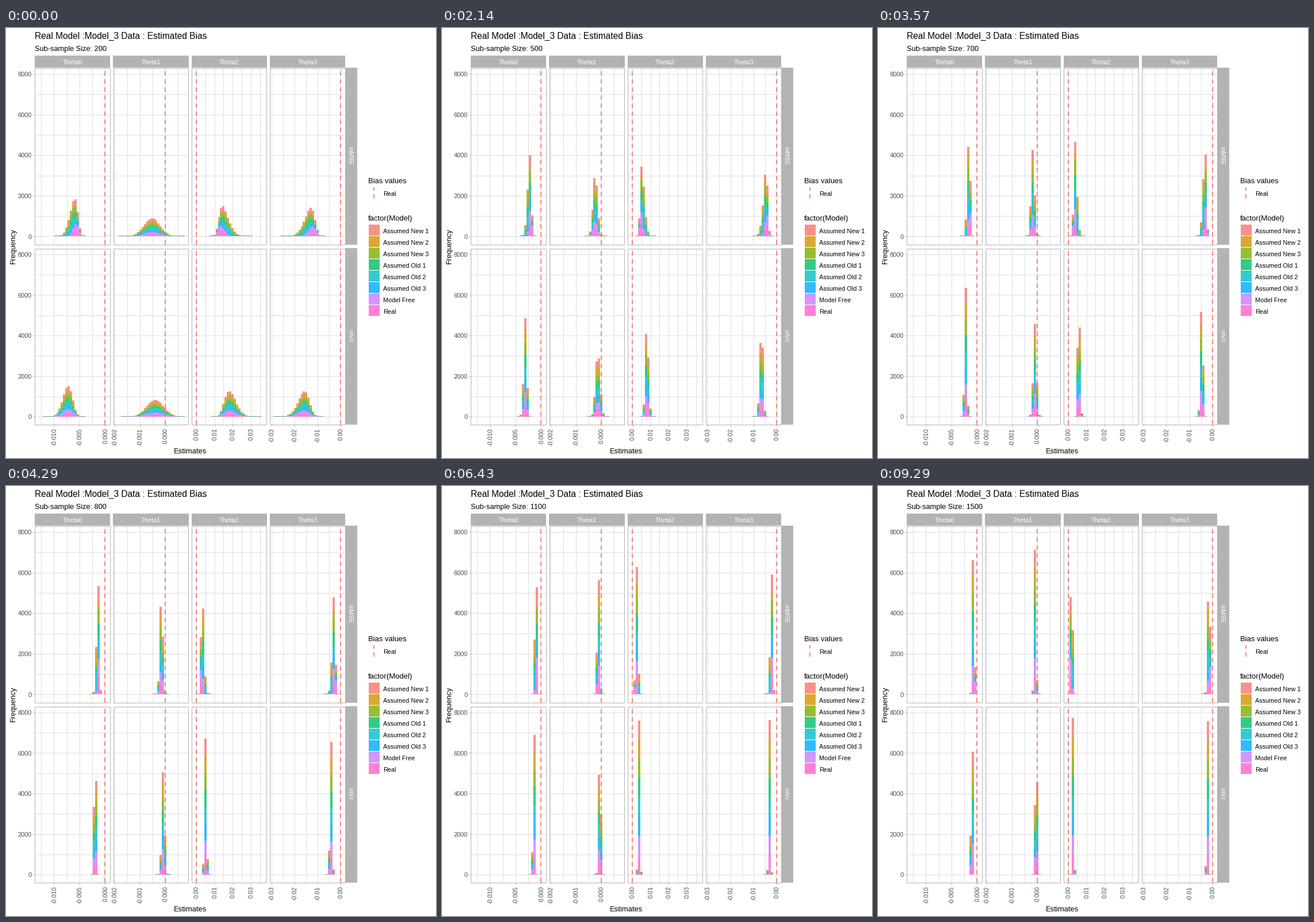
Recreate the animation shown at these times as a matplotlib script. Size 748x748 px, loop 10000 ms.

```python
import math

import numpy as np
import matplotlib.pyplot as plt
from matplotlib.animation import FuncAnimation
from matplotlib.collections import LineCollection, PolyCollection
from matplotlib.colors import to_rgba
from matplotlib.patches import Rectangle

SIZE, DPI = 748, 100
LOOP, TICKS, STEPS = 10000, 100, 14
plt.rcParams["font.family"] = "Liberation Sans"

GREY, GRID, RED, TICK = "#b3b3b3", "#dedede", "#f8766d", "#4d4d4d"
MODELS = [f"Assumed {age} {i}" for age in ("New", "Old") for i in (1, 2, 3)]
MODELS += ["Model Free", "Real"]
FILLS = ["#f8766d", "#cd9600", "#7cae00", "#00be67",
         "#00bfc4", "#00a9ff", "#c77cff", "#ff61cc"]
ALPHA = 0.8
THIN = to_rgba("#86a98a")       # bars with almost no count

LEFT, PITCH, WIDTH = 50.5, 136.3, 130.4
BINS = 30
BIN = WIDTH / 1.1 / BINS        # panels are padded by 5% of the data range
UNIT = 282.3 / 8000             # pixels per count
ROWS = {"mMSE": (69, 377, 362.4), "mVc": (383, 690, 676.1)}

# Per panel: pixel of zero, pixels per label, label unit, decimals, side of zero
COLS = {
    "Theta0": (172.5, 44.5, 0.005, 3, -1),
    "Theta1": (277.3, 44.3, 0.001, 3, 0),
    "Theta2": (331.0, 31.6, 0.01, 2, 1),
    "Theta3": (581.7, 39.8, 0.01, 2, -1),
}

# Bias and spread as (large-sample limit, extra at size 200)
CURVES = {
    ("Theta0", "mMSE"): ((2560, 190), (0.114, -0.018)),
    ("Theta0", "mVc"): ((3580, -280), (0.068, 0.060)),
    ("Theta1", "mMSE"): ((-1370, 190), (430, 290)),
    ("Theta1", "mVc"): ((-665, -235), (385, 375)),
    ("Theta2", "mMSE"): ((2105, 345), (0.160, -0.023)),
    ("Theta2", "mVc"): ((3235, -215), (0.077, 0.091)),
    ("Theta3", "mMSE"): ((2320, 390), (0.156, -0.023)),
    ("Theta3", "mVc"): ((3295, -50), (0.077, 0.079)),
}
# Under mMSE some models lie nearer to zero, some farther (in spreads)
NEAR, FAR = -0.7, 1.4
SHIFT = np.array([NEAR, FAR, 0, 0, FAR, 0, NEAR, NEAR])[:, None]

erf = np.vectorize(math.erf)


def cdf(z):
    """Normal curve with slightly heavy tails."""
    phi = lambda v: 0.5 * (1 + erf(v / math.sqrt(2)))
    return 0.995 * phi(z) + 0.005 * phi(z / 2.5)


def settle(curve, n):
    limit, extra = curve
    return limit + extra * (200 / n) ** 1.5


def bin_edges(col, zero):
    first = round((LEFT + PITCH * col + 0.05 * WIDTH / 1.1 - zero) / BIN + 0.5)
    return np.arange(first, first + BINS + 1) - 0.5


def counts(name, method, edges, n):
    """Expected count per model and bin, 1000 draws for each model."""
    bias, spread = (settle(c, n) for c in CURVES[name, method])
    side = COLS[name][-1]
    if side:
        dist = np.maximum(side * edges, 1e-6)
        z = np.log(dist * n / bias) / spread
    else:
        z = (edges * n - bias) / spread
    shift = SHIFT if side and method == "mMSE" else 0 * SHIFT
    return 1000 * np.abs(np.diff(cdf(z - shift), axis=1))


def bars(n):
    polys, colors = [], []

    def add(x0, x1, y0, y1, color):
        polys.append([(x0, y0), (x1, y0), (x1, y1), (x0, y1)])
        colors.append(color)

    fills = [to_rgba(c, ALPHA) for c in FILLS]
    for c, (name, spec) in enumerate(COLS.items()):
        edges = bin_edges(c, spec[0])
        xs = np.round(spec[0] + edges * BIN)
        for method, (_, _, base) in ROWS.items():
            table = counts(name, method, edges, n)
            for x0, x1, col in zip(xs, xs[1:], table.T):
                bottom = round(base)
                if col.sum() < 0.8:
                    continue
                if col.sum() * UNIT < 1:
                    add(x0, x1, bottom - 1, bottom, THIN)
                    continue
                # stacked upward from the last model
                tops = np.round(base - np.cumsum(col[::-1]) * UNIT)
                for top, fill in zip(tops, fills[::-1]):
                    if top < bottom:
                        add(x0, x1, top, bottom, fill)
                        bottom = top
    return polys, colors


fig = plt.figure(figsize=(SIZE / DPI, SIZE / DPI), dpi=DPI, facecolor="white")
ax = fig.add_axes([0, 0, 1, 1])
ax.set_xlim(0, SIZE)
ax.set_ylim(SIZE, 0)
ax.axis("off")
grid, ticks = [], []


def px(v):
    return v * 72 / DPI


def text(x, y, s, size=10.9, color="black", ha="left", va="baseline", rot=0):
    return ax.text(x, y, s, fontsize=px(size), color=color, ha=ha, va=va,
                   rotation=rot, zorder=6)


def rect(x0, y0, x1, y1, color, alpha=1):
    ax.add_patch(Rectangle((x0, y0), x1 - x0, y1 - y0, fc=color, ec="none",
                           lw=0, alpha=alpha, zorder=1))


def dashed(x, bottom, top):
    ax.plot([x, x], [bottom, top], color=RED, lw=px(1.7), zorder=3,
            dashes=(8 / 1.7, 6 / 1.7), dash_capstyle="butt")


def draw_column(c, name):
    zero, step, unit, digits, _ = COLS[name]
    left = LEFT + PITCH * c
    right = left + WIDTH
    rect(round(left - 0.5), 48, round(right + 0.5), 69, GREY)
    text((left + right) / 2, 63, name, color="white", ha="center")
    for top, bottom, base in ROWS.values():
        for k in range(-8, 9):
            x = zero + k * step / 2
            if left < x < right:
                grid.append([(x, top), (x, bottom)])
        for v in range(0, 8001, 1000):
            y = base - v * UNIT
            grid.append([(left, y), (right, y)])
        dashed(zero, bottom, top)
        ax.add_patch(Rectangle((left, top + 0.5), WIDTH, bottom - top - 1,
                               fc="none", ec=GREY, lw=px(1), zorder=4))
    for k in range(-4, 5):
        x = zero + k * step
        if left < x < right:
            ticks.append([(x, 690), (x, 693)])
            text(x + 0.7, 696, f"{k * unit:.{digits}f}", color=TICK,
                 ha="center", va="top", rot=90)


def draw_row(name):
    top, bottom, base = ROWS[name]
    rect(590, top, 611, bottom, GREY)
    text(598, (top + bottom) / 2 - 0.5, name, color="white",
         ha="center", va="center", rot=270)
    for v in range(0, 8001, 2000):
        y = base - v * UNIT
        ticks.append([(47, y), (50, y)])
        text(45, y + 4.2, str(v), color=TICK, ha="right")


def draw_legend():
    text(630, 270, "Bias values", 13)
    dashed(640, 297, 277)
    text(656, 292, "Real")
    text(630, 335, "factor(Model)", 13.1)
    for i, (name, fill) in enumerate(zip(MODELS, FILLS)):
        y = 342 + 20 * i
        rect(631, y, 650, y + 19, fill, ALPHA)
        text(656, y + 15, name)


for c, name in enumerate(COLS):
    draw_column(c, name)
for name in ROWS:
    draw_row(name)
draw_legend()
for lines, color in ((grid, GRID), (ticks, GREY)):
    ax.add_collection(LineCollection(lines, colors=color, linewidths=px(1),
                                     zorder=1, capstyle="butt"), autolim=False)
text(50, 19, "Real Model :Model_3 Data : Estimated Bias", 15.5)
subtitle = text(50.5, 40, "", 12.8)
text(320.5, 740, "Estimates", 13, ha="center")
text(13, 379, "Frequency", 13, ha="center", va="center", rot=90)

hist = PolyCollection([], antialiased=False, linewidths=0, zorder=2)
ax.add_collection(hist, autolim=False)


def update(i):
    # the sample size jumps in the tick that contains each change
    n = 200 + 100 * ((STEPS * (i + 1) - 1) // TICKS)
    polys, colors = bars(n)
    hist.set_verts(polys)
    hist.set_facecolor(colors)
    subtitle.set_text(f"Sub-sample Size: {n}")
    return hist, subtitle


anim = FuncAnimation(fig, update, frames=TICKS, interval=LOOP / TICKS,
                     repeat=True, repeat_delay=0, blit=False)
plt.show()
```
